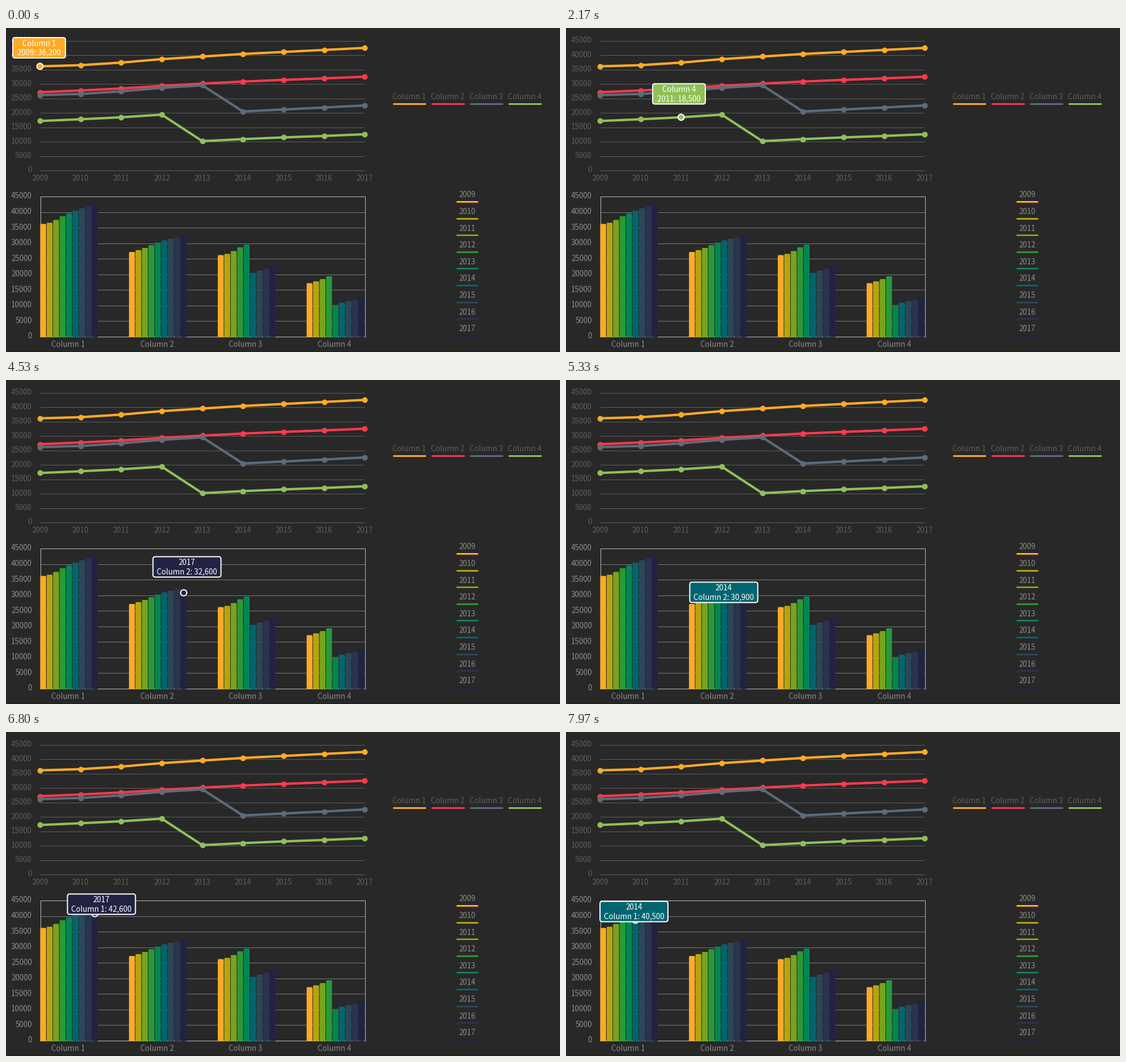
A matplotlib script for the animation above (8 s loop, 978 by 573 pixels).

```python
import numpy as np
import matplotlib.pyplot as plt
from matplotlib.animation import FuncAnimation
from matplotlib.collections import LineCollection, PolyCollection
from matplotlib.patches import Circle, FancyBboxPatch, Rectangle

W, H, DPI = 978, 573, 64
PT = 72 / DPI  # points per pixel
LOOP, INTERVAL = 8000, 20

BG = "#282828"
DIM, MID = "#5e5e5e", "#8c8c8c"
LINE_COLORS = ["#ffaa28", "#fd3a4b", "#5b6c7e", "#8fc158"]
YEAR_COLORS = ["#fbaa2b", "#b5a50c", "#77a31d", "#2b9936", "#008751",
               "#006570", "#2a4858", "#2a344f", "#222244"]

# Two growing series; the other two follow them, with a drop partway.
N = np.arange(9)
YEARS = 2009 + N
FIRST = np.interp(N, [0, 1, 2, 3, 5, 8], [362, 366, 375, 387, 405, 426])
SECOND = np.interp(N, [0, 2, 3, 5, 8], [272, 285, 294, 309, 326])
DATA = [100 * np.round(s).astype(int)
        for s in (FIRST, SECOND,
                  FIRST - np.where(YEARS < 2014, 100, 200),
                  SECOND - np.where(YEARS < 2013, 100, 200))]
NAMES = [f"Column {i}" for i in range(1, 5)]
TICKS = range(0, 45001, 5000)

BAR_X, GROUP, STEP, BAR_W = 60.3, 156.8, 11.43, 10.4

# Pointer stops in ticks of 1/30 s: arrive, depart, x, y
STOPS = [
    (0, 4, 58.5, 73.5), (14, 25, 135, 75), (36, 42, 138, 110),
    (46, 54, 138, 117), (65, 65, 199.5, 155), (70, 87, 204.5, 162),
    (103, 110, 274, 162), (116, 129, 335, 199), (136, 136, 319.5, 369),
    (160, 161, 278.5, 414), (180, 180, 216.8, 442), (204, 204, 168.5, 343),
    (209, 216, 157.5, 337.5), (239, 240, 120, 356),
]
REACH = 13      # how near the pointer must be to a line point
BAR_REACH = 108.4  # width of a bar group that reacts
TIP_RISE = 57   # tooltip top above the pointer

plt.rcParams["font.family"] = ["Noto Sans CJK JP", "DejaVu Sans"]
fig = plt.figure(figsize=(W / DPI, H / DPI), dpi=DPI, facecolor=BG)
ax = fig.add_axes([0, 0, 1, 1])
ax.set_xlim(0, W)
ax.set_ylim(H, 0)
ax.axis("off")


def line_x(i):
    return 60 + 71.65 * i


def line_y(v):
    return 252 - v * 229 / 45000


def bar_left(col, i=0):
    return BAR_X + GROUP * col + STEP * i


def bar_y(v):
    return 546 - v * 248 / 45000


def label(x, y, s, color, ha="center", z=6):
    """Text whose capitals are centred on y."""
    return ax.text(x, y + 4.4, s, color=color, ha=ha, va="baseline",
                   fontsize=13.3 * PT, zorder=z)


def rule(x0, x1, y, color, width):
    y = round(y)
    ax.add_collection(LineCollection([[(x0, y), (x1, y)]], colors=color,
                                     capstyle="butt", linewidths=width * PT,
                                     zorder=1))


def draw_line_chart():
    for v in TICKS:
        rule(60, 633, line_y(v), DIM, 1)
        label(45.5, line_y(v) - 1, str(v), DIM, "right")
    xs = line_x(N)
    for x, year in zip(xs, YEARS):
        label(x, 266, str(year), DIM)
    for k, (vals, color) in enumerate(zip(DATA, LINE_COLORS)):
        ax.plot(xs, line_y(vals), color=color, lw=4.2 * PT, marker="o",
                ms=10 * PT, mew=0, solid_joinstyle="round", zorder=2 + k / 10)
        x = 683 + 67.9 * k
        label(x + 29, 122, NAMES[k], DIM)
        rule(x, x + 58, 134, color, 3)


def draw_bar_chart():
    for v in TICKS:
        label(46, bar_y(v) - 1, str(v), MID, "right")
        if 0 < v < 45000:
            rule(61, 634, bar_y(v), "#7a7a7a", 1)
    ax.add_patch(Rectangle((61, 298), 573, 248, fill=False, ec="#bebebe",
                           lw=PT, zorder=1.5))

    for col, vals in enumerate(DATA):
        label(109.5 + GROUP * col, 560, NAMES[col], MID)
        bars = []
        for i, v in enumerate(vals):
            x, y = bar_left(col, i), bar_y(v)
            r = x + BAR_W
            bars.append([(x, 546.8), (x, y + 1.2), (x + 1.2, y),
                         (r - 1.2, y), (r, y + 1.2), (r, 546.8)])
        ax.add_collection(PolyCollection(bars, facecolors=YEAR_COLORS,
                                         edgecolors="none", zorder=3))

    for i, year in enumerate(YEARS):
        y = 295 + 29.6 * i
        label(814, y, str(year), MID)
        rule(795, 833, y + 12, YEAR_COLORS[i], 3)


draw_line_chart()
draw_bar_chart()
ax.add_patch(Rectangle((0, 571), W, 2, fc="#212121", ec="none", zorder=1))

# Tooltip parts, moved on every frame
ring = Circle((0, 0), 5.4, ec="white", lw=2 * PT, zorder=7)
box = FancyBboxPatch((0, 0), 93, 36, boxstyle="round,pad=0,rounding_size=4",
                     ec="white", lw=2 * PT, zorder=8)
ax.add_patch(ring)
ax.add_patch(box)
title = label(0, 0, "", "white", z=9)
detail = label(0, 0, "", "white", z=9)
TIP = [ring, box, title, detail]


def pointer(tick):
    """Rest at each stop, glide smoothly to the next."""
    for (_, go, x0, y0), (come, leave, x1, y1) in zip(STOPS, STOPS[1:]):
        if tick <= leave:
            break
    u = np.clip((tick - go) / (come - go), 0, 1)
    s = u * u * (3 - 2 * u)
    return x0 + (x1 - x0) * s, y0 + (y1 - y0) * s


def hovered(x, y):
    """Series, index and kind of the mark under the pointer."""
    hit = None
    for col, vals in enumerate(DATA):
        gaps = np.hypot(line_x(N) - x, line_y(vals) - y)
        if gaps.min() < REACH:
            hit = col, int(gaps.argmin()), "point"
        dx = x - bar_left(col)
        if 0 <= dx <= BAR_REACH:
            i = min(int(dx / STEP), 8)
            if bar_y(vals[i]) <= y <= 546:
                hit = col, i, "bar"
    return hit


def place_tip(x, y, col, i, kind):
    value = DATA[col][i]
    if kind == "bar":
        color, width = YEAR_COLORS[i], 120
        ring.center = bar_left(col, i) + BAR_W / 2, bar_y(value) + 10
        head, key = YEARS[i], NAMES[col]
    else:
        color, width = LINE_COLORS[col], 93
        ring.center = line_x(i), line_y(value)
        head, key = NAMES[col], YEARS[i]
    top = y - TIP_RISE
    ring.set_facecolor(color)
    box.set_facecolor(color)
    box.set_bounds(x - width / 2, top + 0.5, width, 36)
    title.set_text(str(head))
    detail.set_text(f"{key}: {value:,}")
    title.set_position((x, top + 15))
    detail.set_position((x, top + 31))


def update(frame):
    tick = 3 * (frame * INTERVAL + 15) // 100
    x, y = pointer(tick)
    hit = hovered(x, y)
    if hit:
        place_tip(x, y, *hit)
    for part in TIP:
        part.set_visible(hit is not None)
    return TIP


anim = FuncAnimation(fig, update, frames=LOOP // INTERVAL, interval=INTERVAL,
                     repeat=True, repeat_delay=0, blit=False)
plt.show()
```
